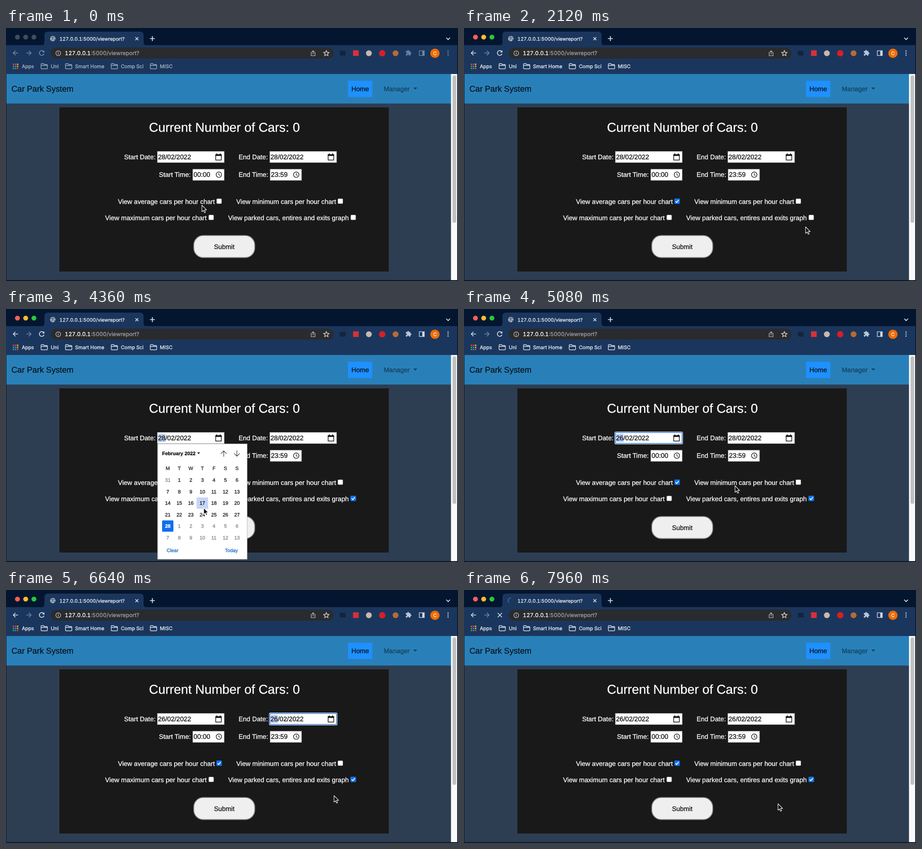
Write an HTML page that moves like this. It is 999x561 px and loops after 8000 ms.

```html
<!DOCTYPE html>
<html lang="en">
<head>
<meta charset="utf-8">
<title>Car Park System</title>
<style>
  html, body { margin: 0; width: 100%; height: 100%; overflow: hidden; background: #0b1626; }
  svg { display: block; width: 999px; height: 561px; }
  text { font-family: "Liberation Sans", Arial, sans-serif; white-space: pre; text-rendering: geometricPrecision; }
  .ui { font-family: Inter, Roboto, sans-serif; font-variant-numeric: tabular-nums; }
</style>
</head>
<body>
<svg id="stage" viewBox="0 0 999 561" xmlns="http://www.w3.org/2000/svg"></svg>
<script>
const LOOP = 8000;
const BLUE = '#0f6fea';
const stage = document.getElementById('stage');

const rect = (x, y, w, h, fill, extra = '') =>
  `<rect x="${x}" y="${y}" width="${w}" height="${h}" fill="${fill}" ${extra}/>`;
const circle = (x, y, r, fill, extra = '') =>
  `<circle cx="${x}" cy="${y}" r="${r}" fill="${fill}" ${extra}/>`;
const line = (d, color, width = 1.5, extra = '') =>
  `<path d="${d}" fill="none" stroke="${color}" stroke-width="${width}" ${extra}/>`;
// A hairline stroke gives the text its slightly heavier weight.
const text = (x, y, str, size, fill, extra = '') =>
  `<text x="${x}" y="${y}" font-size="${size}" fill="${fill}" stroke="${fill}" stroke-width=".3" ${extra}>${str}</text>`;
const group = (id, body, extra = '') => `<g id="${id}" ${extra}>${body}</g>`;

const folder = x => line(`M${x} 80.5q0-1.5 1.5-1.5h4l1.5 2h5.5q1.5 0 1.5 1.5v6.5q0 1.5-1.5 1.5h-11q-1.5 0-1.5-1.5zM${x} 83h14`, '#dbe1ea', 1.4);

function tabStrip() {
  const lights = ['#ff5f57', '#febc2e', '#28c840'];
  return rect(0, 0, 999, 40, '#04162f') +
    group('lightsOff', lights.map((c, i) => circle(25.3 + 18.2 * i, 20.2, 5.4, '#414c5c')).join('')) +
    group('lightsOn', lights.map((c, i) => circle(25.3 + 18.2 * i, 20.2, 5.4, c)).join('')) +
    `<path d="M77 39q8 0 8-8V16q0-8 8-8H296q8 0 8 8V31q0 8 8 8z" fill="#1b365d"/>` +
    group('globe', circle(103.5, 23.5, 6, '#aeb6c1') +
      line('M99 20.5l3 1 1.5 2-2 1 .5 3.5M104 18l-1 2.5 3 1.5 3-2M105 25l3 1-1.5 3', '#46566e', 1.4)) +
    group('spinner', line('M103.5 17.5a6 6 0 0 0-6 6a6 6 0 0 0 2 4.5', '#3f74ae', 1.6)) +
    text(118, 27.5, '127.0.0.1:5000/viewreport?', 10.7, '#eef1f6', 'class="ui"') +
    line('M286 20.500l6.500 6.500m0-6.500l-6.500 6.500', '#e6ebf2') +
    line('M318 23.500h11m-5.500-5.500v11', '#f0f3f7', 1.7) +
    line('M973 21.500l4.200 4.200 4.200-4.200', '#e6ebf2', 1.7);
}

function toolbar() {
  const colors = ['#ea4335', '#ea4335', '#fbbc04', '#34a853', '#4285f4', '#fbbc04', '#34a853', '#4285f4', '#ea4335'];
  const apps = colors.map((c, i) => rect(15 + 4.6 * (i % 3), 79 + 4.6 * Math.floor(i / 3), 3, 3, c)).join('');
  const marks = [[35, 'Apps'], [99, 'Uni'], [152.5, 'Smart Home'], [254, 'Comp Sci'], [340, 'MISC']];
  const path = '<tspan fill="#9ea2a8" stroke="#9ea2a8">:5000/viewreport?</tspan>';
  return rect(0, 38, 999, 64, '#1b365d') +
    group('controls',
      line('M26.500 55.500H16m5-5l-5 5 5 5', '#dfe5ee') +
      group('reload', line('M83.500 52.500a5.300 5.300 0 1 0 .6 4.500', '#dfe5ee', 1.6) +
        '<path d="M84.800 49.500v4.800h-4.800z" fill="#dfe5ee"/>') +
      group('stop', line('M74.500 51l9.500 9.500m0-9.500l-9.500 9.500', '#dfe5ee', 1.6)) +
      '<path transform="translate(882.5 48) scale(.6)" fill="#b9c7dc" d="M20.500 11H19V7c0-1.100-.9-2-2-2h-4V3.500a2.500 2.500 0 0 0-5 0V5H4c-1.100 0-2 .9-2 2v3.800h1.500a2.700 2.700 0 0 1 0 5.400H2V20c0 1.100.9 2 2 2h3.800v-1.500a2.700 2.700 0 0 1 5.400 0V22H17c1.100 0 2-.9 2-2v-4h1.500a2.500 2.500 0 0 0 0-5z"/>' +
      rect(913.5, 50.5, 11, 10.5, 'none', 'stroke="#cbd6e6" stroke-width="1.4"') + rect(920, 50.5, 4.5, 10.5, '#cbd6e6') +
      [51, 55.5, 60].map(y => circle(977, y, 1.3, '#dfe5ee')).join('')) +
    line('M45 55.500h10.500m-5-5l5 5-5 5', '#7187a7') +
    rect(99, 43.5, 625, 24.5, '#2a2b2e', 'rx="12.25"') +
    circle(115.5, 56, 5.3, 'none', 'stroke="#c5c8cc" stroke-width="1.2"') +
    line('M115.500 55v3.800M115.500 52.600v1.400', '#c5c8cc', 1.3) +
    text(130, 60.3, '127.0.0.1' + path, 12.2, '#fff', 'class="ui"') +
    line('M676.500 54h-2v7.500h8.500V54h-2M678.800 58.500v-8m-2.500 2.300l2.500-2.500 2.500 2.500', '#c5c8cc', 1.2) +
    line('M708 50l1.700 4 4.300.4-3.300 2.800 1 4.200-3.700-2.200-3.700 2.200 1-4.200-3.300-2.800 4.300-.4z', '#d5d8dc', 1.4) +
    rect(737.5, 50.5, 13, 10.5, '#13243d', 'rx="1"') +
    rect(767, 49.5, 12.5, 12.5, '#d93038') +
    circle(802, 56, 6.5, '#c9b9aa') +
    circle(831.5, 56, 7, '#d91f26') +
    circle(861, 56, 6.5, '#b66b35') +
    circle(948, 56, 10.3, '#ef6c00') +
    text(948, 59.8, 'C', 10.5, '#fff', 'class="ui" text-anchor="middle"') +
    apps + group('bookmarks',
      [77.5, 131.5, 232.5, 319].map(folder).join('') +
      marks.map(([x, s]) => text(x, 88.5, s, 11, '#f0f3f8', 'class="ui"')).join(''));
}

const calendarIcon = x =>
  line(`M${x - 6} 281h12.4v11.800h-12.400z`, '#111', 1.5) + rect(x - 6.7, 280, 13.8, 3.6, '#111') +
  rect(x - 4.4, 278, 1.8, 3, '#111') + rect(x + 3, 278, 1.8, 3, '#111');

const inputBox = (x, y, w) => rect(x, y, w, 25, '#fff', 'stroke="#8c8c8c" stroke-width=".8"');

const dateInput = (id, x) =>
  inputBox(x, 273.5, 147.8) +
  group(id + 'Ring',
    rect(x - 1, 272.5, 149.8, 27, 'none', 'rx="2.5" stroke="#fff" stroke-width="1.2"') +
    rect(x + .2, 273.7, 147.4, 24.6, 'none', 'rx="1.5" stroke="#1767d2" stroke-width="1.4"')) +
  rect(x + 2, 277, 16, 18, '#b8cdf8', `id="${id}Mark"`) +
  text(x + 1.5, 291, `<tspan id="${id}Day">28</tspan>/02/2022`, 14.6, '#111') +
  calendarIcon(x + 135);

const timeInput = (x, value) =>
  inputBox(x + .3, 313, 69.4) +
  text(x + 2, 330.3, value, 14.8, '#111') +
  circle(x + 58, 325.2, 6, 'none', 'stroke="#111" stroke-width="1.3"') +
  line(`M${x + 58} 321.500v4l2.800 1.800`, '#111', 1.2);

const checkbox = (id, x, y) =>
  rect(x - 5.5, y - 5.5, 11, 11, '#fff', 'rx="1.8" stroke="#8c8c8c" stroke-width=".8"') +
  group(id, rect(x - 6, y - 6, 12, 12, '#0b74f5', 'rx="2"') +
    line(`M${x - 3.5} ${y + .2}l2.500 2.600 4.600-5.400`, '#fff', 1.8));

function page() {
  const label = (x, y, s) => text(x, y, s, 14.56, '#fff');
  return rect(1, 102, 983, 457, '#2d3e53') +
    rect(1, 102, 983, 65.5, '#2980b9') +
    text(12, 141, 'Car Park System', 18.15, '#08131c') +
    rect(756, 117, 53.5, 36, '#1e90ff') +
    text(763.5, 140, 'Home', 14.56, '#08131c') +
    text(835, 140, 'Manager', 14.56, '#14405d') +
    '<path d="M900 132h9l-4.500 4.500z" fill="#14405d"/>' +
    rect(983.5, 102, 14, 457, '#fafafa') + rect(987, 105, 8, 327, '#c1c1c1', 'rx="4"') +
    rect(118, 176, 728, 364, '#191919') +
    text(316, 229.5, 'Current Number of Cars: 0', 28.3, '#fff') +
    label(261, 291, 'Start Date:') + dateInput('start', 334.5) +
    label(514, 291, 'End Date:') + dateInput('end', 583) +
    label(338, 330.3, 'Start Time:') + timeInput(412.5, '00:00') +
    label(514, 330.3, 'End Time:') + timeInput(583.5, '23:59') +
    label(247.5, 390, 'View average cars per hour chart') + checkbox('average', 471, 384) +
    label(509, 390, 'View minimum cars per hour chart') + checkbox('minimum', 739, 384) +
    label(219, 426, 'View maximum cars per hour chart') + checkbox('maximum', 453.5, 420) +
    label(491, 426, 'View parked cars, entires and exits graph') + checkbox('parked', 767.5, 420) +
    rect(415, 460.2, 134.8, 48.8, '#efefef', 'rx="21" stroke="#868686" stroke-width="1.8"') +
    text(482.3, 490, 'Submit', 14.56, '#111', 'text-anchor="middle"');
}

const CELL = 25.5;
function calendar() {
  const centered = 'text-anchor="middle"';
  const heads = [...'MTWTFSS'].map((s, i) => text(357.5 + CELL * i, 357, s, 11, '#222', centered)).join('');
  let days = '';
  for (let i = 0; i < 42; i++) {
    const inMonth = i > 0 && i < 29, selected = i === 28;
    const day = i === 0 ? 31 : inMonth ? i : i - 28;
    days += text(357.5 + CELL * (i % 7), 383.3 + CELL * Math.floor(i / 7), day, 11,
      selected ? '#fff' : inMonth ? '#111' : '#808080', centered + (selected ? ' font-weight="bold"' : ''));
  }
  return rect(335, 299, 198, 256, '#fff', 'stroke="#a8a8a8" stroke-width=".8"') +
    text(345, 323.5, 'February 2022', 10.9, '#111', 'font-weight="bold"') +
    '<path d="M422.500 318h6.500l-3.250 3.500z" fill="#111"/>' +
    line('M481.300 327.500v-13m-6.300 6.300l6.300-6.300 6.300 6.300M510.300 313.500v13m-6.300-6.300l6.300 6.300 6.300-6.300', '#333', 1.2) +
    heads + rect(0, 0, CELL, CELL, '#c6d5f9', 'id="hover" rx="2"') +
    rect(345, 468.7, 25, 25, BLUE, 'rx="1.5"') + days +
    text(355, 539, 'Clear', 10.9, '#1564c0') + text(484, 539, 'Today', 10.7, '#1564c0');
}

const arrow = '<path d="M0 0V14.300L3.300 11.300L5.600 16.400L8 15.400L5.700 10.400H10.200Z" fill="#0a0a0a" stroke="#fff" stroke-width="1.1" stroke-linejoin="round"/>';

stage.innerHTML = rect(0, 0, 999, 561, '#0b1626') + tabStrip() + toolbar() + page() +
  rect(997.5, 0, 1.5, 561, '#0b1424') +
  group('calendar', calendar()) + group('cursor', arrow);

const el = {};
for (const node of stage.querySelectorAll('[id]')) el[node.id] = node;

// Cursor stops: time, x, y
const stops = [
  [0, 433, 393], [40, 433, 393], [400, 470, 385], [1440, 470, 385],
  [2120, 755, 441], [2240, 761, 430], [2480, 769, 419], [2880, 768, 419],
  [3240, 434, 264], [3680, 469, 285], [3900, 469, 285],
  [4360, 437, 441], [4600, 485, 455], [4720, 485, 455],
  [5080, 599, 392], [5400, 718, 285], [5640, 718, 285],
  [6160, 733, 455], [6520, 731, 456], [6640, 725, 456], [6960, 720, 462],
  [7360, 500, 486], [7600, 500, 486], [7960, 694, 474], [8000, 694, 474]
];

function cursorAt(t) {
  const i = Math.max(1, stops.findIndex(s => s[0] > t));
  const [t0, x0, y0] = stops[i - 1], [t1, x1, y1] = stops[i];
  const p = (t - t0) / (t1 - t0), e = p * p * (3 - 2 * p);
  return [x0 + (x1 - x0) * e, y0 + (y1 - y0) * e];
}

const show = (node, on) => node.setAttribute('visibility', on ? 'visible' : 'hidden');
const between = (t, from, to) => t >= from && t < to;

function showHover(x, y) {
  const col = Math.floor((x - 344.75) / CELL), row = Math.floor((y - 366.75) / CELL);
  const inside = col >= 0 && col < 7 && row >= 0 && row < 6;
  el.hover.setAttribute('opacity', inside ? 1 : 0);
  el.hover.setAttribute('x', 344.75 + CELL * col);
  el.hover.setAttribute('y', 366.75 + CELL * row);
}

function render(t) {
  const active = t >= 640, loading = t >= 7640;
  const startOpen = between(t, 3840, 4700), endOpen = between(t, 5560, 6480);
  const [x, y] = cursorAt(t);
  el.cursor.setAttribute('transform', `translate(${x} ${y})`);

  show(el.lightsOn, active);
  show(el.lightsOff, !active);
  el.controls.setAttribute('opacity', active ? 1 : .5);
  el.bookmarks.setAttribute('opacity', active ? 1 : .68);

  show(el.average, t >= 1000);
  show(el.minimum, false);
  show(el.maximum, false);
  show(el.parked, t >= 2600);

  show(el.startMark, between(t, 3800, 5500));
  show(el.startRing, between(t, 4700, 5500));
  show(el.endMark, between(t, 5500, 7520));
  show(el.endRing, between(t, 6480, 7520));
  el.startDay.textContent = t >= 4700 ? '26' : '28';
  el.endDay.textContent = t >= 6480 ? '26' : '28';

  const shift = endOpen ? 248.5 : 0;
  show(el.calendar, startOpen || endOpen);
  el.calendar.setAttribute('transform', `translate(${shift} 0)`);
  showHover(x - shift, y);

  show(el.globe, !loading);
  show(el.reload, !loading);
  show(el.spinner, loading);
  show(el.stop, loading);
  el.spinner.setAttribute('transform', `rotate(${(7960 - t) * .3} 103.5 23.5)`);
}

const began = performance.now();
function tick() {
  render((performance.now() - began) % LOOP);
  requestAnimationFrame(tick);
}
render(0);
requestAnimationFrame(tick);
</script>
</body>
</html>
```
